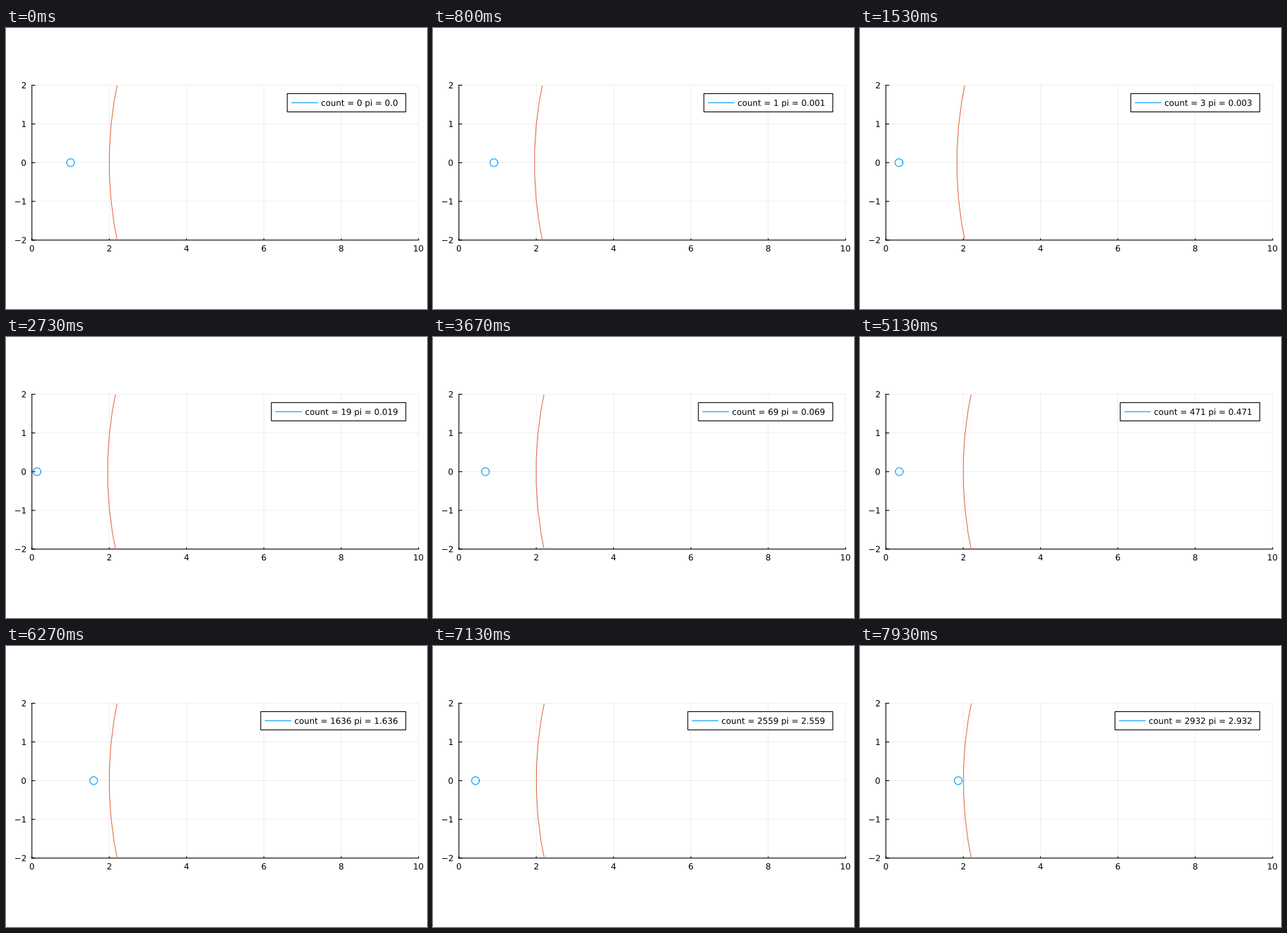
Write a matplotlib script that moves like this. It is 600 px wide and 400 px high and loops after 8 s.

```python
import numpy as np
import matplotlib.pyplot as plt
from matplotlib.animation import FuncAnimation
from matplotlib.patches import PathPatch, Rectangle
from matplotlib.textpath import TextPath
from matplotlib.transforms import Affine2D

plt.rcParams["path.snap"] = False
plt.rcParams["font.family"] = "DejaVu Sans"

W, H, DPI = 600, 400, 100
LOOP_MS, TICK_MS, RATE = 8000, 20, 15
LEFT, RIGHT, TOP, BOTTOM = 36.9, 588.0, 81.5, 301.9
UNIT = (RIGHT - LEFT) / 10
MID = (TOP + BOTTOM) / 2
FONT = 11.9
BLUE, RED = "#009afa", "#e36f47"
LINE = 1.1 * 72 / DPI

# Collisions: unit-speed heavy ball, mass ratio ROOT**2.
# Every hit puts the balls back at x = 1 and x = 2, a gap of 0.9 to the next hit.
ROOT, GAP, R_SMALL, R_BIG = 1000, 0.9, 0.1, 10.0
TURN = np.arctan(1 / ROOT)
HITS = int(np.pi / TURN)
steps = GAP / (ROOT * np.sin(np.arange(1, HITS + 1) * TURN))
hit_times = np.concatenate([[0], np.cumsum(steps)])
STEP_TIME = (hit_times[-1] + 0.1) / 199


def px(x):
    return LEFT + UNIT * x


def py(y):
    return MID - UNIT * y


def state(t):
    """Hit count, small ball centre and big ball left edge at time t."""
    count = int(np.searchsorted(hit_times, t, side="right")) - 1
    phi = 2 * ((count + 1) // 2) * TURN
    dt = t - hit_times[count]
    way = -1 if count % 2 else 1
    return count, 1 + way * ROOT * np.sin(phi) * dt, 2 - np.cos(phi) * dt


def text_path(s, x, baseline, align):
    """Glyph outlines placed by their ink; returns path and ink left."""
    path = TextPath((0, 0), s, size=FONT)
    box = path.get_extents()
    left = x - box.width * {"center": 0.5, "right": 1}[align]
    move = Affine2D().scale(1, -1).translate(left - box.x0, baseline)
    return move.transform_path(path), left


fig = plt.figure(figsize=(W / DPI, H / DPI), dpi=DPI, facecolor="white")
ax = fig.add_axes([0, 0, 1, 1])
ax.set_xlim(0, W)
ax.set_ylim(H, 0)
ax.axis("off")


def line(xs, ys, color="black", width=LINE, z=2, **kw):
    return ax.plot(xs, ys, color=color, lw=width, zorder=z, **kw)[0]


def label(s, x, baseline, align):
    path, _ = text_path(s, x, baseline, align)
    ax.add_patch(PathPatch(path, fc="black", lw=0, zorder=3))


def grid(xs, ys):
    line(xs, ys, width=0.6 * 72 / DPI, z=1, alpha=0.1)


for v in range(0, 11, 2):
    grid([px(v)] * 2, [TOP, BOTTOM])
    line([px(v)] * 2, [BOTTOM, BOTTOM - 2.5], solid_capstyle="butt")
    label(str(v), px(v), 318, "center")
for v in range(-2, 3):
    grid([LEFT, RIGHT], [py(v)] * 2)
    line([LEFT, LEFT + 4.2], [py(v)] * 2)
    label(str(v).replace("-", "\u2212"), 28.2, py(v) + 4.4, "right")
line([LEFT, RIGHT], [BOTTOM, BOTTOM], solid_capstyle="projecting")
line([LEFT, LEFT], [TOP, BOTTOM], solid_capstyle="projecting")

angle = np.linspace(0, 2 * np.pi, 100)
small = line([], [], BLUE, z=4)
big = line([], [], RED, z=4)
stage = Rectangle((LEFT, TOP), RIGHT - LEFT, BOTTOM - TOP, transform=ax.transData)
for ball in (small, big):
    ball.set_clip_path(stage)

BOX_TOP, BOX_BOTTOM, BOX_RIGHT = 93.4, 119.4, 569.8
box = ax.add_patch(Rectangle((0, BOX_TOP), 1, BOX_BOTTOM - BOX_TOP,
                             fc="white", ec="black", lw=LINE, zorder=5))
key = line([], [], BLUE, z=6)
caption = ax.add_patch(PathPatch(TextPath((0, 0), "0", size=FONT),
                                 fc="black", lw=0, zorder=6))


def draw_ball(ball, centre, radius):
    ball.set_data(px(centre + radius * np.cos(angle)), py(radius * np.sin(angle)))


def update(i):
    # The picture steps 15 times a second, on the tick in which a step falls.
    step = (i * TICK_MS + TICK_MS - 1) * RATE // 1000
    count, x, edge = state(step * STEP_TIME)
    draw_ball(small, x, R_SMALL)
    draw_ball(big, edge + R_BIG, R_BIG)
    path, left = text_path(f"count = {count} pi = {count / ROOT}", 557.9, 110.8, "right")
    caption.set_path(path)
    key.set_data([left - 42.3, left - 5.7], [106.4, 106.4])
    box.set_x(left - 48.7)
    box.set_width(BOX_RIGHT - left + 48.7)
    return small, big, box, key, caption


anim = FuncAnimation(fig, update, frames=LOOP_MS // TICK_MS, interval=TICK_MS,
                     init_func=lambda: update(0), repeat=True, repeat_delay=0)
plt.show()
```
